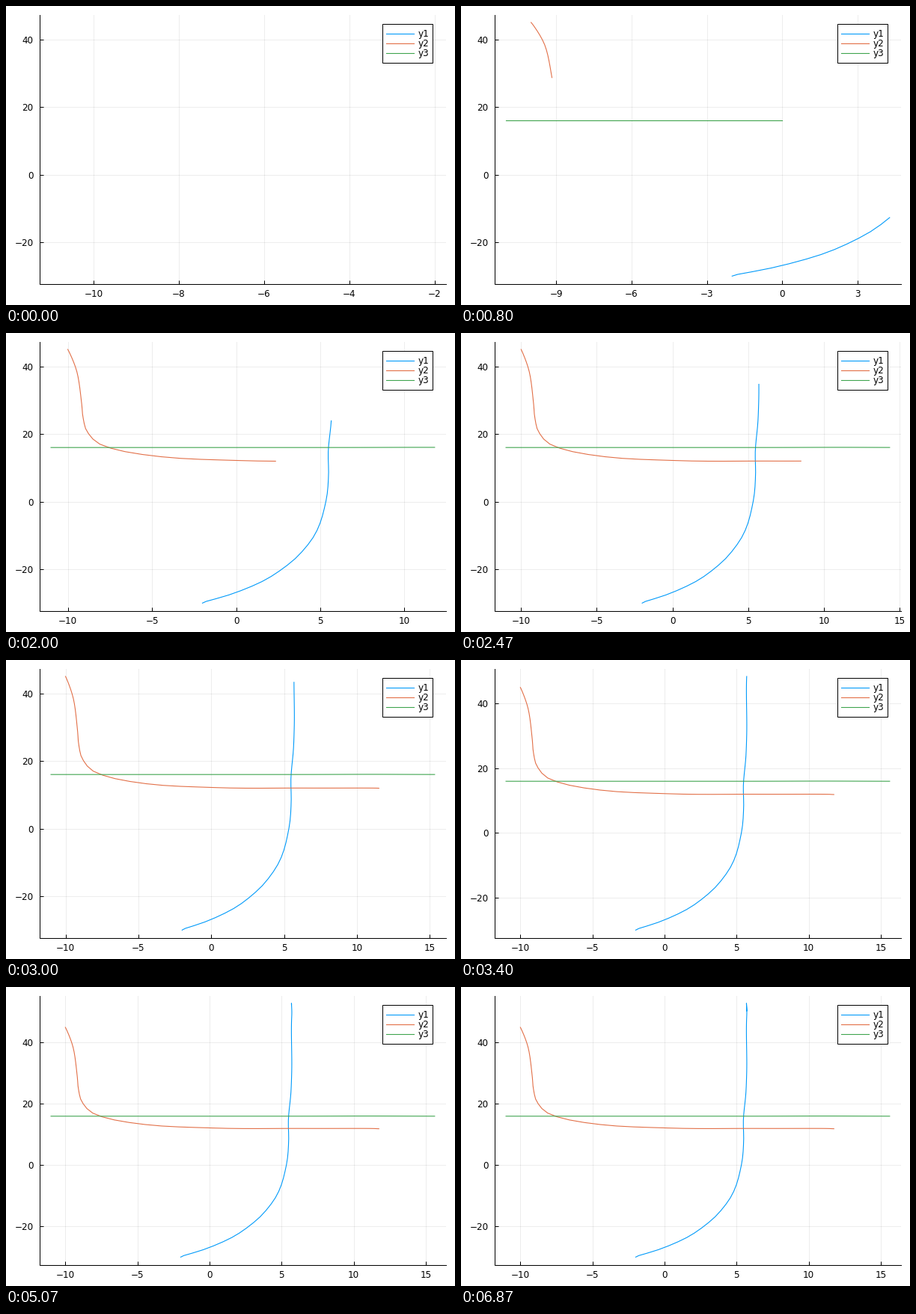
A matplotlib script that plays this animation: 600 by 400 pixels, repeating every 7.99 s.

```python
import numpy as np
import matplotlib.pyplot as plt
from matplotlib.animation import FuncAnimation
from matplotlib.patches import Rectangle

W, H, DPI = 600, 400, 100
LOOP, N = 7990, 120
PX = 72 / DPI
COLORS = ["#009afa", "#e26f47", "#3ea44e"]

plt.rcParams["font.family"] = "DejaVu Sans"
plt.rcParams["font.size"] = 12 * PX


def hermite(t, *keys):
    """Smooth curve through (t, v) keys, held beyond both ends."""
    ts, vs = np.array(keys, float).T
    t = np.clip(t, ts[0], ts[-1])
    m = np.gradient(vs, ts)
    i = np.clip(np.searchsorted(ts, t, side="right") - 1, 0, len(ts) - 2)
    h = ts[i + 1] - ts[i]
    u = (t - ts[i]) / h
    return ((1 + 2 * u) * (1 - u) ** 2 * vs[i] + u * (1 - u) ** 2 * h * m[i]
            + u * u * (3 - 2 * u) * vs[i + 1] + u * u * (u - 1) * h * m[i + 1])


def climbing(k):
    """Bends upward, brakes, then backs up a little."""
    y = hermite(k, (0, -30), (1, -29.5), (5, -25), (9, -18.8), (12, -12.7),
                (24, 12.7), (30, 23.9), (37, 34.7), (44, 42.3), (51, 48.4),
                (60, 51.95), (68, 52.8), (76, 52.45), (87, 51.35), (103, 50.4))
    x = hermite(y, (-30, -2), (-29.5, -1.78), (-28.4, -.96), (-25, .94),
                (-18.8, 3.04), (-12.7, 4.27), (0, 5.33), (8, 5.49),
                (14.5, 5.47), (23.9, 5.65), (30, 5.7), (47, 5.69),
                (50, 5.71), (52.8, 5.685))
    return np.array([x, y])


def turning(k):
    """Drops steeply, then levels out to the right."""
    keys = [(0, -10, 45), (1, -9.94, 44.45), (6, -9.46, 38.4),
            (12, -9.17, 28.7), (15, -9.08, 24.5), (18, -8.77, 20.1),
            (20, -8.1, 17), (22, -6.6, 14.78), (24, -4.45, 13.27),
            (28, .2, 12.15), (34, 6.15, 12), (41, 10.75, 12), (48, 11.75, 11.9)]
    return np.array([hermite(k, *((t, x) for t, x, _ in keys)),
                     hermite(k, *((t, y) for t, _, y in keys))])


def straight(k):
    """Runs level and slows to a halt."""
    x = hermite(k, (0, -11), (1, -10.5), (6, -5.6), (12, 0), (24, 8.65),
                (37, 14.35), (49, 15.62))
    return np.array([x, 16 + 0.05 * np.exp(-((x - 11) / 3) ** 2)])


def padded(v):
    lo, hi = v.min(), v.max()
    pad = 0.03 * (hi - lo)
    return lo - pad, hi + pad


def nice_ticks(lo, hi):
    """Choose the step with the best mix of count, coverage and roundness."""
    span = hi - lo
    best, ticks, step = -1, [], 1
    for z in (0.1, 1, 10, 100):
        for q, nice in ((1, 1), (5, .9), (2, .7), (2.5, .5), (3, .2)):
            s = q * z
            r = np.arange(np.ceil(lo / s), np.floor(hi / s) + 1)
            n = len(r)
            if not 4 <= n <= 8:
                continue
            score = ((1 - abs(n - 5) / 5) / 4 + (0 in r) / 6
                     + 0.5 * span / ((n - 1) * s) + nice / 4)
            if score > best:
                best, ticks, step = score, r * s, s
    digits = 0 if step == int(step) else 1
    labels = [f"{v + 0.0:.{digits}f}".replace("-", "\u2212") for v in ticks]
    return ticks, labels


steps = np.arange(N)
paths = [move(steps) for move in (climbing, turning, straight)]

fig = plt.figure(figsize=(W / DPI, H / DPI), dpi=DPI, facecolor="white")
L, R, T, B = 44.7, 588.2, 11.8, 371.5
ax = fig.add_axes([L / W, 1 - B / H, (R - L) / W, (B - T) / H])
ax.spines[["top", "right"]].set_visible(False)
ax.spines[["left", "bottom"]].set_linewidth(PX)
ax.tick_params(direction="in", length=5 * PX, width=PX)
ax.tick_params(axis="x", pad=7.3 * PX)
ax.tick_params(axis="y", pad=8 * PX)
ax.grid(color="black", alpha=0.07, lw=PX)
ax.set_axisbelow(True)
lines = [ax.plot([], [], color=c, lw=1.1 * PX)[0] for c in COLORS]

# Legend, laid out in pixels
key = fig.add_axes([0, 0, 1, 1], xlim=(0, W), ylim=(H, 0))
key.axis("off")
key.add_patch(Rectangle((502.5, 23.5), 67.5, 52, fc="white", ec="black", lw=PX))
for i, c in enumerate(COLORS):
    y = 36.6 + 13 * i
    key.plot([508, 545], [y, y], color=c, lw=1.1 * PX, zorder=3)
    key.text(550.3, y + 4.4, f"y{i + 1}", va="baseline", zorder=3)


def update(k):
    for line, p in zip(lines, paths):
        line.set_data(p[:, :k + 1])
    xy = np.hstack([p[:, :k + 1] for p in paths])
    xlim, ylim = padded(xy[0]), padded(xy[1])
    ax.set_xticks(*nice_ticks(*xlim))
    ax.set_yticks(*nice_ticks(*ylim))
    ax.set_xlim(xlim)
    ax.set_ylim(ylim)
    return lines


anim = FuncAnimation(fig, update, frames=N, init_func=lambda: update(0),
                     interval=LOOP / N, repeat=True, repeat_delay=0)
plt.show()
```
